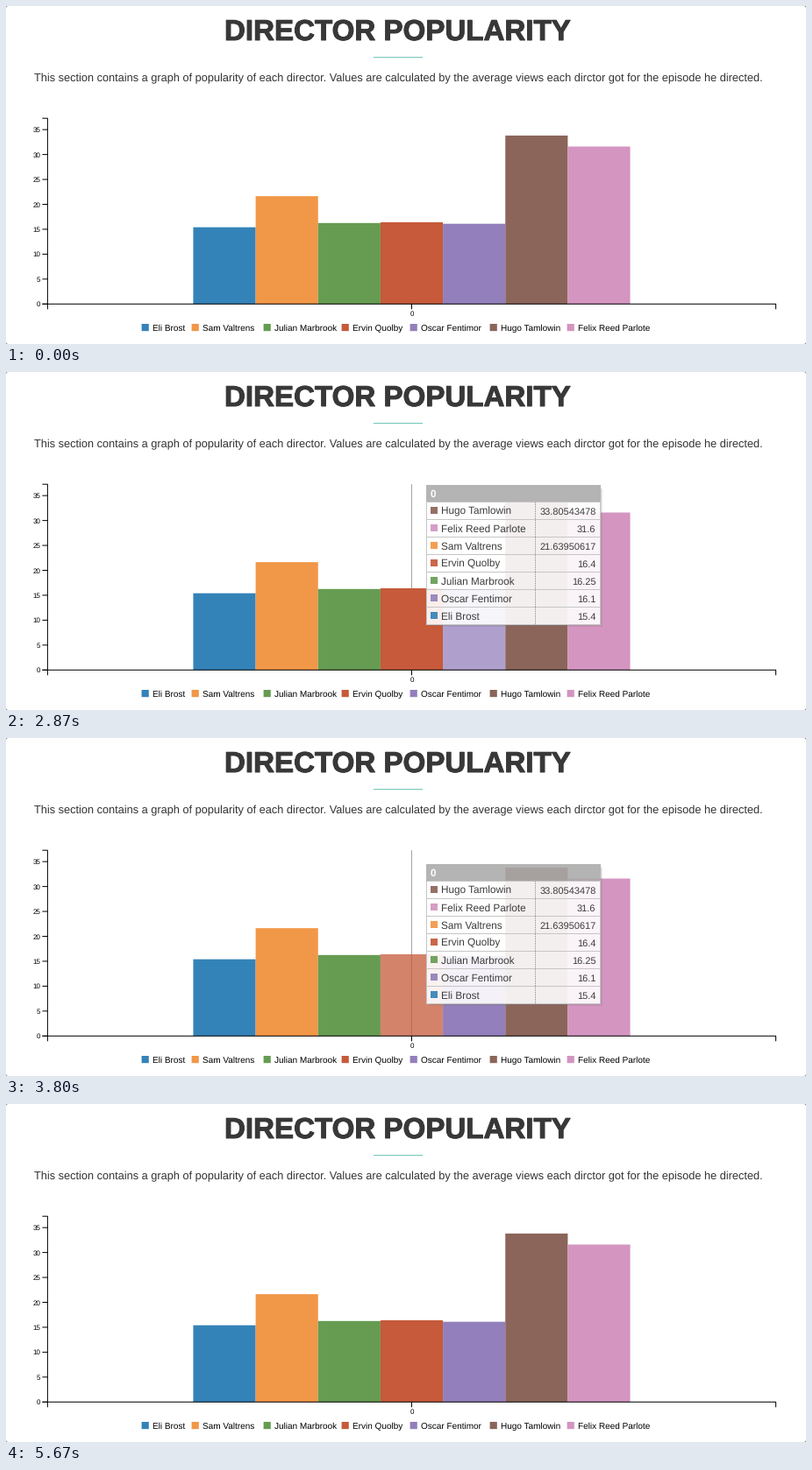
Animation of 912 by 386 pixels, one loop 5.74 s. Source, as a matplotlib script:

```python
import numpy as np
import matplotlib.pyplot as plt
from matplotlib.animation import FuncAnimation
from matplotlib.lines import Line2D
from matplotlib.patches import FancyBboxPatch, Rectangle
from matplotlib.patheffects import withStroke
from matplotlib.transforms import Affine2D

W, H, DPI = 912, 386, 64
LOOP, STEP = 5740, 35
PX = 72 / DPI  # points per pixel
SANS = "Liberation Sans"

# name, value, colour, legend text x
DIRECTORS = [
    ("Eli Brost", 15.4, "#3483b8", 167),
    ("Sam Valtrens", 21.63950617, "#f19748", 224),
    ("Julian Marbrook", 16.25, "#669c52", 306),
    ("Ervin Quolby", 16.4, "#c65a3a", 395),
    ("Oscar Fentimor", 16.1, "#937fbb", 473),
    ("Hugo Tamlowin", 33.80543478, "#8b6559", 564),
    ("Felix Reed Parlote", 31.6, "#d495c0", 652),
]

# Plot area
LEFT, RIGHT, TOP, BASE = 47.4, 877.6, 128.2, 340.3
MID = (LEFT + RIGHT) / 2
UNIT = 5.69
BAR_W = (RIGHT - LEFT) * 0.6 / 7
BAR_X = MID - 3.5 * BAR_W

# Pointer path: time, x, y
PATH = np.array([
    (0, 700, 385), (180, 695, 360), (500, 676, 290), (850, 640, 286),
    (1400, 545, 301), (1750, 533, 303), (2300, 533, 302), (2800, 533, 304),
    (2900, 533, 304), (3060, 512, 366), (3480, 508, 367), (3720, 456, 319),
    (4860, 456, 319), (5020, 425, 366), (5230, 425, 367), (5360, 425, 385),
    (LOOP, 425, 385),
])

plt.rcParams["text.hinting"] = "no_hinting"
plt.rcParams["path.snap"] = False
fig = plt.figure(figsize=(W / DPI, H / DPI), dpi=DPI, facecolor="#9a9a9a")
ax = fig.add_axes([0, 0, 1, 1])
ax.set_xlim(0, W)
ax.set_ylim(H, 0)
ax.axis("off")

shift = Affine2D()
tip_space = shift + ax.transData
tip = []


def rect(x, y, w, h, color, z=1, **kw):
    return ax.add_patch(Rectangle((x, y), w, h, fc=color, lw=0, zorder=z, **kw))


def line(xs, ys, color="black", z=4, **kw):
    artist = Line2D(xs, ys, color=color, lw=PX, zorder=z,
                    solid_capstyle="butt", solid_joinstyle="miter", **kw)
    return ax.add_line(artist)


def text(x, y, s, px, color="black", z=5, **kw):
    return ax.text(x, y, s, fontsize=px * PX, color=color, zorder=z,
                   family=SANS, va="baseline", **kw)


def draw_page():
    ax.add_patch(FancyBboxPatch((0, 0), W, H, fc="white", lw=0, zorder=0,
                                boxstyle="round,pad=0,rounding_size=3"))
    text(446.5, 39, "DIRECTOR POPULARITY", 33.1, "#383838",
         ha="center", weight="bold",
         path_effects=[withStroke(linewidth=PX, foreground="#383838")])
    rect(419, 58, 56, 1.2, "#7ccabd")
    text(447.5, 86,
         "This section contains a graph of popularity of each director. "
         "Values are calculated by the average views each dirctor got "
         "for the episode he directed.", 12.76, "#333333", ha="center")


def draw_axes():
    line([LEFT - 6, LEFT, LEFT, LEFT - 6], [TOP, TOP, BASE, BASE])
    line([LEFT, LEFT, RIGHT, RIGHT], [BASE + 6, BASE, BASE, BASE + 6])
    line([MID, MID], [BASE, BASE + 6])
    for v in range(0, 36, 5):
        y = BASE - v * UNIT
        line([LEFT - 6, LEFT], [y, y])
        text(39.5, y + 3, str(v), 8, ha="right")
    text(MID, 354, "0", 8, ha="center")


def draw_legend():
    for name, _, color, x in DIRECTORS:
        rect(x - 12.4, 363, 8.2, 8.2, color)
        text(x, 371, name, 10)


def draw_bars():
    bars = []
    for i, (_, value, color, _) in enumerate(DIRECTORS):
        h = value * UNIT
        bars.append(rect(BAR_X + i * BAR_W, BASE - h, BAR_W, h, color, 3))
    return bars


def draw_tip():
    x0, x1, split, row, head = 479, 678, 603.5, 20, 19.5
    height = 20 + row * len(DIRECTORS)
    kw = dict(transform=tip_space)
    # soft shadow along the right and bottom edges
    for k in (1, 2):
        tip.append(rect(x1, 4, k, height - 4 + k, "#777777", 6, alpha=0.15, **kw))
        tip.append(rect(x0 + 4, height, x1 - x0 - 4, k, "#777777", 6,
                        alpha=0.15, **kw))
    tip.append(rect(x0, head, x1 - x0, height - head, "white", 7,
                    alpha=0.9, **kw))
    tip.append(rect(x0, 0, x1 - x0, head, "#aaaaaa", 8, alpha=0.88, **kw))
    tip.append(text(483.5, 14, "0", 11.5, "white", 10, weight="bold", **kw))
    ranked = sorted(DIRECTORS, key=lambda d: -d[1])
    for i, (name, value, color, _) in enumerate(ranked):
        y = 20 + i * row
        tip.append(line([x0, x1], [y - 0.5, y - 0.5], "#c6c6c6", 9, **kw))
        tip.append(rect(484, y + 5, 8, 8, color, 9, alpha=0.92, **kw))
        tip.append(text(496, y + 13.5, name, 11.8, "#3c3c3c", 10, **kw))
        tip.append(text(672.5, y + 13.5, f"{value:.10g}", 11, "#3c3c3c", 10,
                        ha="right", **kw))
    tip.append(line([split, split], [20, height], "#8c8c8c", 9,
                    linestyle=(0, (1, 1)), **kw))
    tip.append(line([x0 + .5, x0 + .5, x1 - .5, x1 - .5],
                    [head, height - .5, height - .5, head], "#c6c6c6", 9, **kw))


def pointer(t):
    i = min(np.searchsorted(PATH[:, 0], t, side="right"), len(PATH) - 1)
    a, b = PATH[i - 1], PATH[i]
    u = (t - a[0]) / (b[0] - a[0])
    return a[1:] + (b[1:] - a[1:]) * u * u * (3 - 2 * u)


def legend_hit(x, y):
    if 361 <= y <= 374:
        for i, (name, _, _, lx) in enumerate(DIRECTORS):
            if lx - 13 <= x <= lx + 4.8 * len(name):
                return i
    return None


def update(frame):
    x, y = pointer(frame * STEP)
    inside = TOP <= y <= BASE
    focus = legend_hit(x, y)
    for i, bar in enumerate(bars):
        alpha = 1
        if focus is not None and focus != i:
            alpha = 0.29
        elif inside and bar.get_x() <= x < bar.get_x() + BAR_W and y >= bar.get_y():
            alpha = 0.75
        bar.set_alpha(alpha)
    guide.set_visible(inside)
    shift.clear().translate(0, round(y - 175))
    for artist in tip:
        artist.set_visible(inside)
    return []


draw_page()
guide = line([MID, MID], [TOP, BASE], "#a4a4a4", 2)
bars = draw_bars()
draw_axes()
draw_legend()
draw_tip()

anim = FuncAnimation(fig, update, frames=LOOP // STEP, interval=STEP,
                     init_func=lambda: update(0), repeat=True,
                     repeat_delay=0, blit=False)
plt.show()
```
